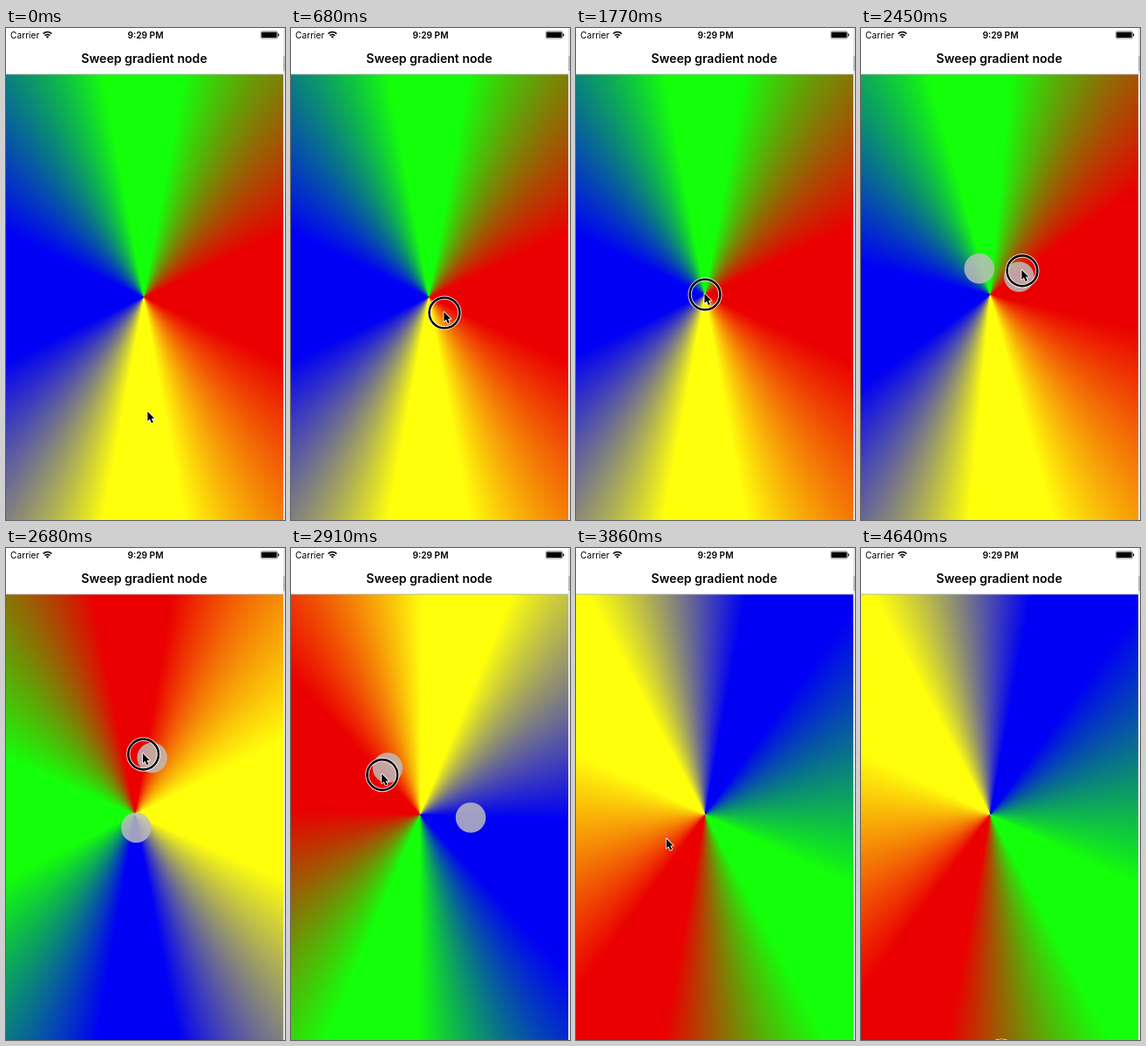
An HTML page with a canvas that plays this animation: 320x563 px, repeating every 4690 ms.

```html
<!DOCTYPE html>
<html lang="en">
<head>
<meta charset="utf-8">
<title>Sweep gradient node</title>
<style>
  html, body { margin: 0; width: 100%; height: 100%; overflow: hidden; background: #fff; }
  canvas, svg { position: absolute; left: 0; top: 0; width: 320px; height: 563px; }
  text { font-family: Inter, "Open Sans", sans-serif; fill: #000; }
</style>
</head>
<body>
<canvas id="stage" width="320" height="563"></canvas>
<svg viewBox="0 0 320 563">
  <rect width="318" height="53" fill="#fff"/>
  <rect y="52.6" width="318" height=".8" fill="#a8a8a8"/>
  <text x="5" y="11.5" font-size="10.2">Carrier</text>
  <text x="160" y="11.5" font-size="10.2" font-weight="600" text-anchor="middle">9:29 PM</text>
  <text x="158.5" y="40" font-size="14.1" font-weight="600" text-anchor="middle">Sweep gradient node</text>
  <path d="M42.6 6.6a7 7 0 0 1 9.8 0M44.6 8.7a4.1 4.1 0 0 1 5.8 0" fill="none" stroke="#000" stroke-width="1.5"/>
  <path d="M45.9 10.1a2.3 2.3 0 0 1 3.2 0L47.5 11.7z"/>
  <rect x="292.4" y="3.9" width="19" height="8" rx="1.6" fill="none" stroke="#000" stroke-width=".5"/>
  <rect x="293.2" y="4.7" width="17.4" height="6.4" rx=".8"/>
  <path d="M312.1 6.3q1.3.3 1.3 1.6t-1.3 1.6z"/>
  <rect x="318" width="2" height="563" fill="#e6e6e6"/>
  <rect x="318" y="32" width="2" height="17" fill="#b9bdb9"/>
</svg>
<script>
const LOOP = 4690;
const HOME = [158, 308];
const HUB = [158.5, 280];
const ASPECT = 510 / 318;
const COLORS = ['#ea0000', '#ffff0c', '#0000f4', '#14ff0a'];
const RAD = Math.PI / 180;

const DRAG_START = 690, DRAG_END = 1820, DRAG_LAG = 90;
const SWING_START = 2430, SWING_TIME = 1000, SWING_LEAD = 120;
const EXIT_START = 3700, EXIT_END = 4640;
const PINCH = [2140, 3680];
const PRESSED = [[600, DRAG_END], [2290, 3600], [4560, LOOP]];

const clamp = u => Math.min(1, Math.max(0, u));
const smooth = u => u * u * (3 - 2 * u);
const mix = (a, b, u) => a.map((v, i) => v + (b[i] - v) * u);
const within = (t, [a, b]) => t >= a && t < b;

// Share of the two-finger turn that is done
const swing = t => Math.sin(clamp((t - SWING_START) / SWING_TIME) * Math.PI / 2);

// The finger winds outwards around the hub as it turns
function orbit(t) {
  const s = swing(t + SWING_LEAD);
  const angle = (53 - 262 * s) * RAD, radius = 15 + 52.5 * s;
  return [HUB[0] + radius * Math.cos(angle), HUB[1] + radius * Math.sin(angle)];
}

// Key points [ms, x, y] up to the start of the turn
const PATH = [
  [0, 163, 440], [560, 176, 326], [680, 176, 326], [1000, 220, 284],
  [1230, 157, 294], [1400, 124, 309], [1700, 148, 305], [1880, 148, 305],
  [SWING_START - SWING_LEAD, ...orbit(0)]
];

// Smooth curve through the key points, without overshoot
function follow(t) {
  let i = 0;
  while (i < PATH.length - 2 && t >= PATH[i + 1][0]) i++;
  const a = PATH[i], b = PATH[i + 1], d = b[0] - a[0];
  const u = clamp((t - a[0]) / d);
  const slope = (k, c) => {
    const p = PATH[k - 1], q = PATH[k], r = PATH[k + 1];
    if (!p || !r) return 0;
    const m = (q[c] - p[c]) / (q[0] - p[0]), n = (r[c] - q[c]) / (r[0] - q[0]);
    return m * n > 0 ? 2 * m * n / (m + n) : 0;
  };
  return [1, 2].map(c => a[c] + (b[c] - a[c]) * smooth(u)
    + d * u * (1 - u) * ((1 - u) * slope(i, c) - u * slope(i + 1, c)));
}

function pointerAt(t) {
  if (t < SWING_START - SWING_LEAD) return follow(t);
  const exit = clamp((t - EXIT_START) / (EXIT_END - EXIT_START));
  return mix(orbit(t), [161, 581], smooth(exit));
}

// The gradient catches up with the pointer and stays where it is released
function centerAt(t) {
  const dragged = pointerAt(Math.min(t, DRAG_END) - DRAG_LAG);
  return mix(HOME, dragged, smooth(clamp((t - DRAG_START) / 200)));
}

const ctx = document.getElementById('stage').getContext('2d');
const arrow = new Path2D('M0 0V12L2.8 9.5L5 14.5L7.2 13.5L5 8.7H8.7Z');

function disc([x, y], r) {
  ctx.beginPath();
  ctx.arc(x, y, r, 0, 7);
}

function drawSweep([x, y], degrees) {
  const sweep = ctx.createConicGradient(degrees * RAD, 0, 0);
  const hold = 0.045;
  for (let i = 0; i <= 4; i++) {
    for (const side of [-hold, hold]) {
      sweep.addColorStop(clamp(i / 4 + side), COLORS[i % 4]);
    }
  }
  ctx.save();
  ctx.beginPath();
  ctx.rect(0, 53, 318, 510);
  ctx.clip();
  ctx.translate(x, y);
  ctx.scale(1, ASPECT);
  ctx.fillStyle = sweep;
  ctx.fillRect(-400, -400, 800, 800);
  ctx.restore();
}

function drawTouches(touch) {
  ctx.fillStyle = 'rgba(190,190,190,.84)';
  for (const spot of [touch, mix(touch, HUB, 2)]) {
    disc(spot, 17.3);
    ctx.fill();
  }
}

function drawRing(spot) {
  disc(spot, 17.4);
  for (const [color, width] of [['rgba(255,255,255,.8)', 4.4], ['#000', 2.4]]) {
    ctx.strokeStyle = color;
    ctx.lineWidth = width;
    ctx.stroke();
  }
}

function drawArrow([x, y]) {
  ctx.save();
  ctx.translate(x - 0.6, y - 1);
  ctx.scale(0.9, 0.9);
  ctx.lineJoin = 'round';
  ctx.strokeStyle = '#fff';
  ctx.lineWidth = 1.8;
  ctx.stroke(arrow);
  ctx.fillStyle = '#000';
  ctx.fill(arrow);
  ctx.restore();
}

function draw(t) {
  const pointer = pointerAt(t);
  ctx.clearRect(0, 0, 320, 563);
  drawSweep(centerAt(t), -237 * swing(t));
  if (within(t, PINCH)) drawTouches(pointerAt(t - 40));
  if (PRESSED.some(span => within(t, span))) drawRing(pointer);
  drawArrow(pointer);
}

const start = performance.now();
function tick(now) {
  draw(Math.max(0, now - start) % LOOP);
  requestAnimationFrame(tick);
}
draw(0);
requestAnimationFrame(tick);
</script>
</body>
</html>
```
